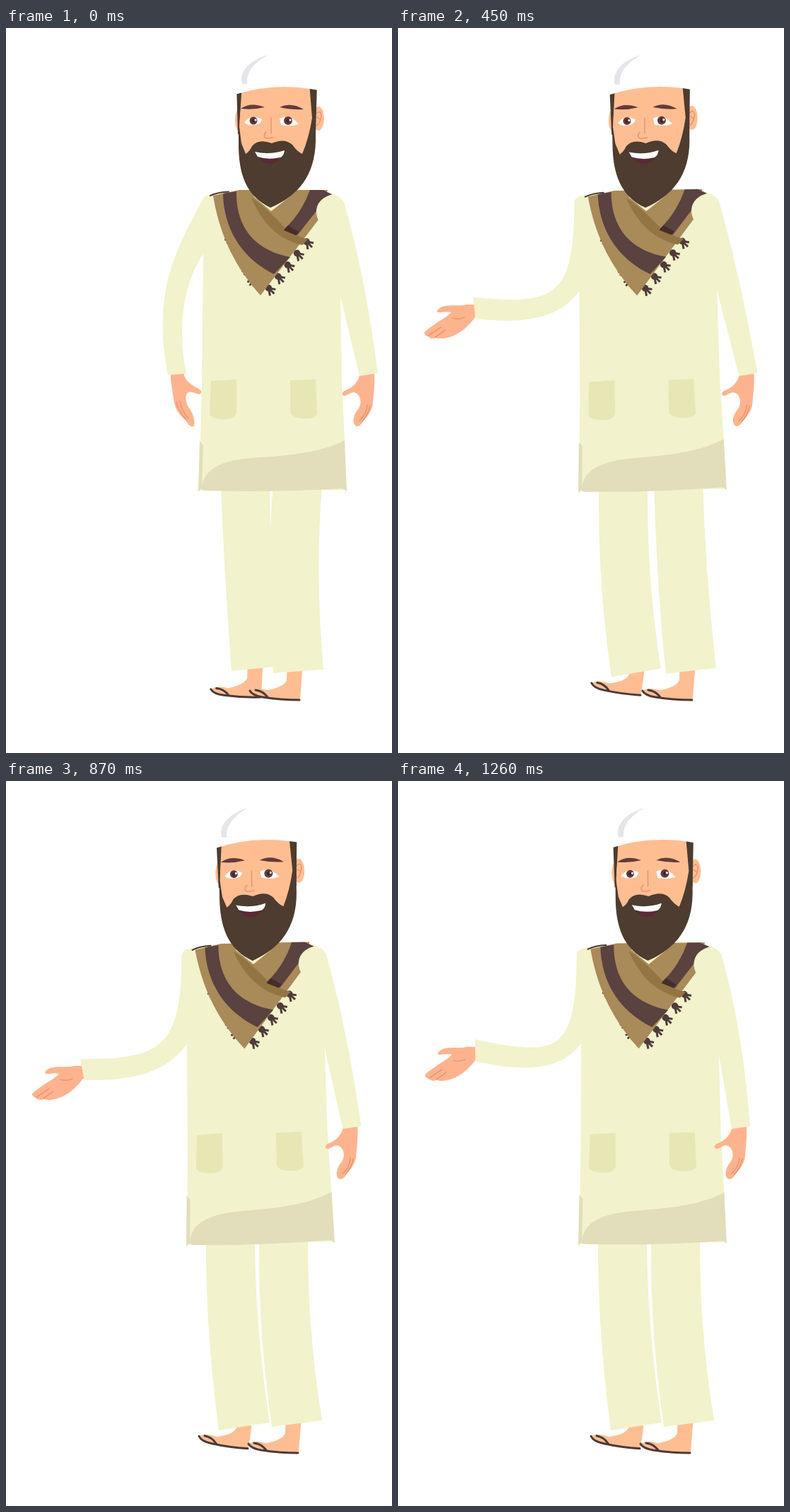
Animation, 546 px wide and 1025 px high, one loop 1830 ms. Source, as an HTML page:

```html
<!DOCTYPE html>
<html lang="en">
<head>
<meta charset="utf-8">
<title>Greeting</title>
<style>
html, body { margin: 0; width: 100%; height: 100%; overflow: hidden; background: #fff; }
svg { display: block; width: 100%; height: 100%; }
.cloth { fill: #f2f2cc; }
.hem { fill: #e2ddba; }
.pocket { fill: #e7e7b5; }
.skin { fill: #ffbe92; }
.hand { fill: #fdb48e; }
.dark { fill: #59423f; }
.hair { fill: #4d3c2f; }
.brow { fill: #633b3a; }
.white { fill: #fff; }
.line { fill: none; stroke: #e8926f; stroke-width: 1.4; stroke-linecap: round; }
.strap { fill: none; stroke: #4c3a39; stroke-width: 3; stroke-linecap: round; }
</style>
</head>
<body>
<svg viewBox="0 0 546 1025">
  <defs>
    <g id="foot">
      <path class="skin" d="M398 885H421L416 949Q380 949 358 944Q345 940 347 936Q354 932 370 936Q393 932 397 922z"/>
      <path class="strap" d="M345 937Q349 944 363 946Q388 950 415 950M353 936Q363 937 370 946"/>
    </g>
    <g id="tassel" fill="#4f3c3a">
      <circle r="4.8"/>
      <path stroke="#4f3c3a" stroke-width="3" d="M0 0L2 11M0 0L8 8M0 0L10 2"/>
    </g>
  </defs>

  <use href="#foot" id="footL"/>
  <use href="#foot" id="footR"/>
  <path class="cloth" id="legL"/>
  <path class="cloth" id="legR"/>

  <g class="body">
    <path class="cloth" d="M300 231L290 236Q281 260 279 320L277 500L275 588L273 653H480L479 585L475 500L473 362L476 246Q465 235 452 231z"/>
    <path class="hem" d="M274 584L279 590L277 651L272 656zM277 653C278 625 300 610 360 607C410 604 450 598 479 583L482 655L476 651Q377 657 281 654z"/>
    <path class="pocket" d="M290 499L326 497V545Q322 554 308 553Q291 553 288 546zM402 498L438 497L440 546Q436 553 422 552Q404 552 402 543z"/>
  </g>

  <g id="backHand">
    <path class="hand" d="M233 488L252 487V496C255 505 262 510 270 514C276 516 279 521 274 523C270 524 262 517 257 521C252 527 255 535 258 541C264 548 268 560 266 568C262 571 258 566 254 560C246 552 240 545 238 535C236 520 233 508 233 496z"/>
    <path class="line" d="M246 533Q249 548 258 557M241 534Q244 547 254 558"/>
  </g>
  <g id="palm">
    <path class="hand" d="M118 380L95 380C85 383 75 380 66 382C58 383 52 389 55 391C60 392 66 389 74 391C70 396 60 402 52 407C46 412 38 416 36 420C37 424 40 425 42 425C42 428 50 429 52 427C58 429 66 428 72 426C88 421 98 411 108 398H118z"/>
    <path class="line" d="M76 399Q84 402 93 398M42 424L60 412M52 426L66 416"/>
  </g>
  <path class="cloth" id="armL"/>

  <g id="handR">
    <path class="hand" d="M521 480H500V492C497 502 489 509 481 512C475 514 474 519 478 520C484 520 488 513 495 516C502 520 504 532 498 539C492 546 489 557 494 562C499 565 503 560 506 555C513 547 518 540 519 530C520 515 522 503 521 489z"/>
    <path class="line" d="M511 533Q510 546 500 555M515 534Q512 547 504 556"/>
  </g>
  <path class="cloth" id="armR"/>

  <g class="body">
    <g id="fringe"></g>
    <path fill="#a98a59" d="M293 237L330 229H455L442 271L360 378C330 345 303 300 293 237z"/>
    <path class="dark" d="M307 234L326 231C325 277 347 313 402 324L379 348C337 327 308 288 307 234z"/>
    <path fill="#937443" d="M347 240Q364 250 392 280Q405 293 427 299L419 307C388 299 364 280 347 240z"/>
    <path class="dark" d="M430 229H448L461 235L438 260L412 293L394 284Q418 262 430 229z"/>
    <path fill="#452d2b" d="M399 279L414 288L410 293L393 286z"/>
    <path class="strap" style="stroke-width:2" d="M289 237Q300 232 315 231.500"/>
    <path class="cloth" d="M442 272C434 256 442 239 463 235L476 245L480 300zM350 238L375 259L402 238z"/>

    <ellipse class="skin" cx="329" cy="130" rx="5" ry="15"/>
    <ellipse class="skin" cx="442" cy="128" rx="8" ry="17"/>
    <path class="line" d="M439 121Q445 115 446 124Q444 136 439 138M440 126L444 129"/>
    <path class="hair" d="M326 78H336L331 125L330 150H328zM428 78H440L438 150H430z"/>
    <path class="skin" d="M334 78H429L433 128L425 182H333L330 140z"/>
    <path class="hair" d="M329 132L333 163L339 178Q345 174 348 167Q357 156 376 163Q394 155 405 165Q412 175 419 178Q428 157 433 128L438 124V160C437 208 414 237 374 254C338 237 329 203 329 165z"/>
    <path fill="#5b2838" d="M356 181H388Q385 192 373 192Q360 191 356 181z"/>
    <path class="white" d="M352 175Q373 180 394 173Q393 181 388 183Q371 187 356 182z"/>
    <path class="line" d="M375 127V149M368 147Q362 154 369 156L378 155"/>
    <path class="white" d="M337 134Q346 121 362 129Q360 139 343 137zM387 128Q402 121 414 136Q404 140 389 137z"/>
    <g class="brow">
      <circle cx="350" cy="131" r="5.500"/><circle cx="399" cy="131" r="6"/>
      <path d="M332 114Q346 104 366 112Q350 116 332 114zM387 112Q403 104 421 115Q405 116 387 112z"/>
    </g>
    <g fill="#43272a"><circle cx="350" cy="131" r="2.500"/><circle cx="399" cy="131" r="2.500"/></g>
    <g class="white"><circle cx="353" cy="130" r="1.600"/><circle cx="402" cy="130" r="1.600"/></g>
    <path class="white" d="M324 94Q380 76 442 88V36H324z"/>
    <path fill="#e5e5ea" d="M371 38C345 45 329 62 334 79L341 79C340 62 350 50 371 38z"/>
  </g>
</svg>
<script>
const LOOP = 1830, STEP = 30, END = 1260, STEP_IN = 570;
const $ = id => document.getElementById(id);
const set = (id, name, value) => $(id).setAttribute(name, value);
const polar = ([x, y], r, deg) => [x + r * Math.cos(deg * Math.PI / 180), y + r * Math.sin(deg * Math.PI / 180)];

// Key poses, each starting with its time in ms
const lift = [[0, 93], [150, 116], [300, 134], [380, 137], [570, 125], [750, 132], [800, 134], [990, 125], [END, 136]];
const tilt = [[0, 0], [300, -.45], [690, -1.75], [990, -.75], [END, -.5]];
const swing = [[0, 0], [150, -33], [300, -16.5], [750, -22], [END, -28]];
const stride = [[0, -3, -55], [150, -36, -52], [300, -17, -69], [STEP_IN, -10, -73]]; // knee bend, foot x

// Smooth interpolation that never overshoots the keys
function sample(keys, t) {
  const last = keys.length - 1;
  if (t >= keys[last][0]) return keys[last].slice(1);
  const i = keys.findIndex(k => k[0] > t) - 1;
  const a = keys[i], b = keys[i + 1], h = b[0] - a[0], u = (t - a[0]) / h, w = 1 - u;
  const slope = (j, n) => (keys[j + 1][n] - keys[j][n]) / (keys[j + 1][0] - keys[j][0]);
  const tangent = (j, n) => {
    if (j === 0) return slope(0, n);
    if (j === last) return 0;
    const p = slope(j - 1, n), q = slope(j, n);
    return p * q > 0 ? 2 * p * q / (p + q) : 0;
  };
  return a.slice(1).map((v, k) =>
    v * w * w * (1 + 2 * u) + b[k + 1] * u * u * (3 - 2 * u)
    + h * u * w * (w * tangent(i, k + 1) - u * tangent(i + 1, k + 1)));
}

// Trouser leg: both edges bend alike, the hem rises by slant
function drawLeg(id, hip, hemX, hemY, width, bend, slant) {
  const mid = (hip + hemX) / 2 + bend, right = hemX + width;
  set(id, "d", `M${hip} 645Q${mid} 775 ${hemX} ${hemY}L${right} ${hemY - slant}`
    + `Q${(hip + 69 + right) / 2 + bend} 775 ${hip + 69} 645z`);
}

function drawLegs(t) {
  const s = Math.min(1, t / STEP_IN), arc = Math.sin(Math.PI * s);
  const [bend, foot] = sample(stride, t);
  const turn = (-60 - foot) * .28, shift = 4 * arc - 2 * s;
  drawLeg("legL", 307 - 14 * s + bend, 374 + foot, 911.5 + turn * 1.8, 62 + 10 * s, bend, 4 - bend * .7);
  drawLeg("legR", 378 - 20 * s, 378 + shift, 912 + s, 71, 9 * arc - 11, 5 + 4 * s);
  set("footL", "transform", `translate(${foot} ${bend * .32 - 3}) rotate(${turn} 416 950)`);
  set("footR", "transform", `translate(${shift})`);
}

// Left arm: one lift angle places the wrist, folds the elbow and turns the cuff
function drawLeftArm(t, onBody) {
  const [angle] = sample(lift, t), rise = angle - 93;
  const wrist = polar([255, 240], 250 - 4.3 * Math.max(0, angle - 125), angle);
  const fore = 79 + 2.98 * rise - .0083 * rise * rise;
  const cuff = 86 + (fore - 79) * .82, half = 13 + rise * .06;
  const outer = polar(wrist, half, cuff + 90), inner = polar(wrist, half, cuff - 90);
  const top = onBody(297, 233), [sx, sy] = onBody(278, 243);
  const shoulder = [sx - rise * .11, sy];
  const upper = polar(shoulder, 80 + 1.4 * Math.max(0, fore - 146), 90 + .4 * Math.max(0, 150 - fore));
  const pit = onBody(280, Math.min(368, 318 + (fore - 79) * .65));
  set("armL", "d", `M${shoulder}C${upper} ${polar(outer, -118, fore)} ${outer}L${inner}`
    + `C${polar(inner, -64, fore)} ${pit[0] - 31} ${pit[1] + 45} ${pit}h40L${top}`
    + `Q${shoulder[0] + 3} ${top[1] + 2} ${shoulder}`);

  const back = t < 225;
  set("backHand", "visibility", back ? "visible" : "hidden");
  set("palm", "visibility", back ? "hidden" : "visible");
  set("backHand", "transform", `translate(${wrist}) rotate(${2 * rise}) translate(-242 -495)`);
  set("palm", "transform", `translate(${wrist}) translate(-107 -385)`);
}

// Right arm: it bows outwards as the cuff comes closer to the body
function drawRightArm(t, onBody) {
  const [x] = sample(swing, t);
  const shoulder = onBody(478, 246), spread = 526 + x - shoulder[0];
  const bow = (shoulder[0] + 526 + x) / 2 + Math.max(0, 60 - spread) * .5;
  set("armR", "d", `M${onBody(455, 233)}Q${onBody(472, 235)} ${shoulder}Q${bow} 350 ${526 + x} 488`
    + `L${500 + x} 492L${onBody(473, 427 - spread)}h-25z`);
  set("handR", "transform", `translate(${x})`);
}

function draw(t) {
  const [turn] = sample(tilt, t);
  const step = Math.min(1, t / 300), tx = -17 * step, ty = -3 * Math.sin(Math.PI * step);
  const cos = Math.cos(turn * Math.PI / 180), sin = Math.sin(turn * Math.PI / 180);
  const onBody = (x, y) => [
    377 + tx + (x - 377) * cos - (y - 655) * sin,
    655 + ty + (x - 377) * sin + (y - 655) * cos
  ];
  for (const g of document.querySelectorAll(".body"))
    g.setAttribute("transform", `translate(${tx} ${ty}) rotate(${turn} 377 655)`);
  drawLegs(t);
  drawLeftArm(t, onBody);
  drawRightArm(t, onBody);
}

// Five tassels along each edge of the scarf
const tassel = (x, y, turn, size) =>
  `<use href="#tassel" transform="translate(${x} ${y}) rotate(${turn}) scale(${size})"/>`;
for (let i = 0; i < 5; i++)
  $("fringe").innerHTML += tassel(425 - 13.4 * i, 302 + 16.4 * i, 0, 1)
    + tassel(319 + 8 * i, 297 + 14.8 * i, 85, .9);

function tick(now) {
  const t = Math.floor(now % LOOP / STEP) * STEP;
  draw(Math.min(t, END));
  requestAnimationFrame(tick);
}
draw(0);
requestAnimationFrame(tick);
</script>
</body>
</html>
```
